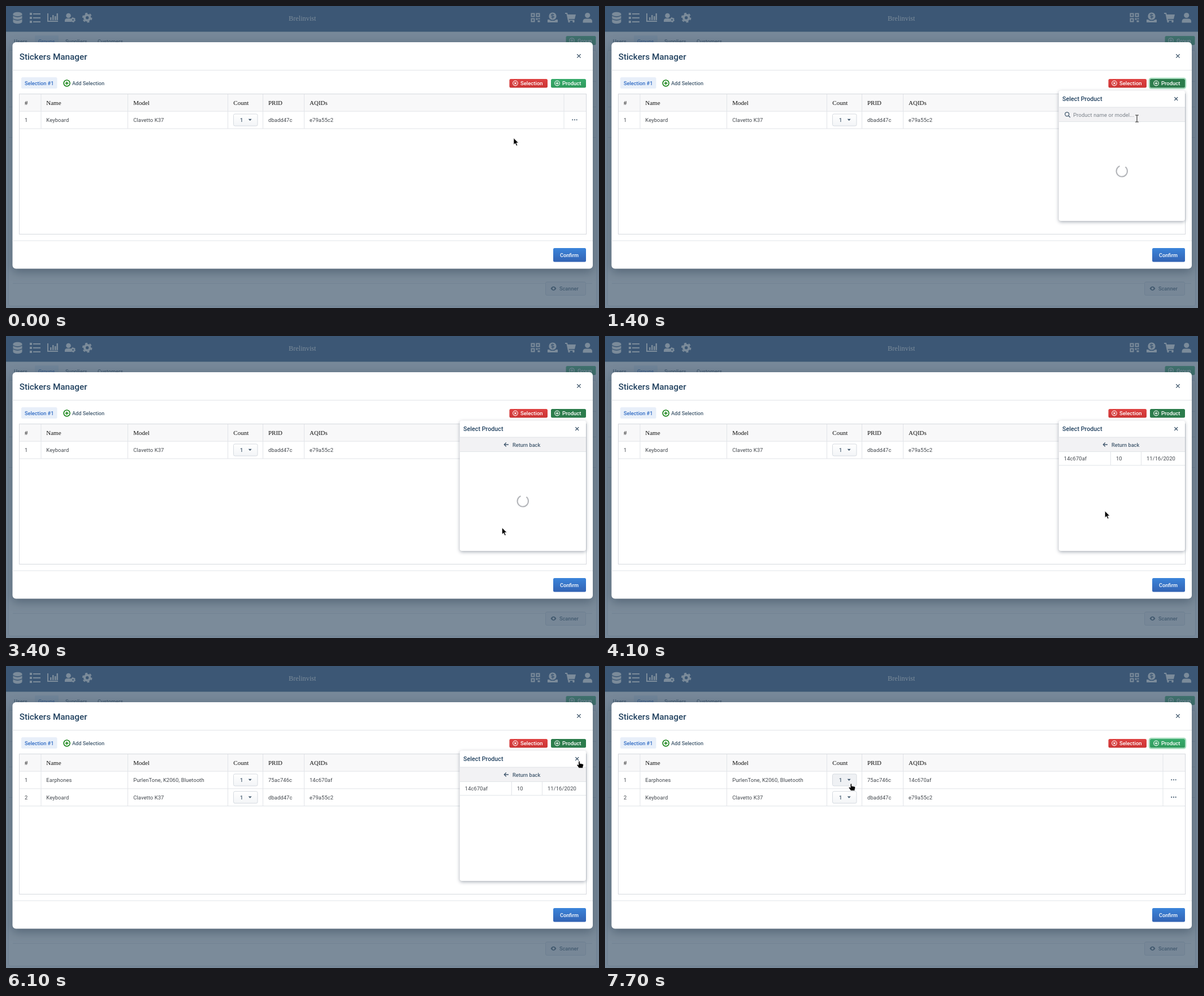
Recreate the animation shown at these times as an HTML page. Size 1049 by 534 pixels, loop 8 s.

```html
<!DOCTYPE html>
<html lang="en">
<head>
<meta charset="utf-8">
<title>Stickers Manager</title>
<style>
  html, body { margin: 0; width: 100%; height: 100%; overflow: hidden; background: #7b8c9a; }
  svg { display: block; width: 100vw; height: 100vh; }
  text { font: 9.4px Roboto, sans-serif; letter-spacing: .1px; fill: #435a6f; white-space: pre; }
  .cell { fill: #42474d; }
  .m { font-weight: 500; font-size: 9.2px; letter-spacing: 0; }
  .b { font-weight: 500; font-size: 9.5px; letter-spacing: 0; fill: #fff; }
  .h { font-weight: 500; font-size: 10.75px; letter-spacing: 0; fill: #234361; }
  .title { font-weight: 500; font-size: 15.36px; letter-spacing: -.05px; fill: #234361; }
  .serif { font: 11px "Liberation Serif", serif; letter-spacing: 0; fill: #111; }
  .brand { font: 12.3px "Liberation Serif", serif; letter-spacing: 0; fill: #fff; }
  .blue { fill: #2f6bc4; }
  .hint { fill: #7a8189; }
  .line { stroke: #e1e4e8; fill: none; }
  .ink { stroke: #435a6f; fill: none; stroke-width: 1.3; }
  .wire { stroke: #fff; fill: none; stroke-width: 1.1; }
  .modal { filter: drop-shadow(0 5px 9px rgba(20, 40, 60, .4)); }
  .pop { filter: drop-shadow(0 2px 3px rgba(40, 55, 75, .4)); }
</style>
</head>
<body>
<svg id="stage" viewBox="0 0 1049 534" preserveAspectRatio="none">
  <defs>
    <linearGradient id="blue" x2="0" y2="1"><stop stop-color="#3b84da"/><stop offset="1" stop-color="#3363b3"/></linearGradient>
    <linearGradient id="red" x2="0" y2="1"><stop stop-color="#df4343"/><stop offset="1" stop-color="#cb3434"/></linearGradient>
    <linearGradient id="green" x2="0" y2="1"><stop stop-color="#38ab6c"/><stop offset="1" stop-color="#2f9a5c"/></linearGradient>
    <linearGradient id="pale" x2="0" y2="1"><stop stop-color="#fff"/><stop offset="1" stop-color="#f3f5f7"/></linearGradient>
    <clipPath id="listBox"><path d="M803 204.500h223v175h-223z"/></clipPath>
  </defs>

  <g id="page">
    <rect width="1049" height="534" fill="#f4f7fb"/>
    <rect width="1049" height="45.500" fill="#2c5282"/>
    <g id="icons" fill="#fff">
      <path d="M12.500 14.500c0-5 16-5 16 0v13c0 5-16 5-16 0z"/>
      <path d="M12 16.500q8.500 5 17 0M12 22.500q8.500 5 17 0" fill="none" stroke="#2c5282" stroke-width="1.300"/>
      <path d="M42 12h4v4h-4zm6 1h13v2H48zm-6 6h4v4h-4zm6 1h13v2H48zm-6 6h4v4h-4zm6 1h13v2H48z"/>
      <path d="M73 13h2v13h17v2H73zm5 7h2.500v5H78zm4-4h2.500v9H82zm4 2h2.500v7H86zm3.500-5H92v12h-2.500z"/>
      <circle cx="110.500" cy="17" r="4.300"/>
      <path d="M104 28v-2q0-4 4-4h5q2 0 3 2l-1 4z"/>
      <circle cx="118.500" cy="24.500" r="2.600" fill="none" stroke="#fff" stroke-width="2.200"/>
      <circle cx="118.500" cy="24.500" r="4.200" fill="none" stroke="#fff" stroke-dasharray="2.200"/>
      <circle cx="143.700" cy="20.800" r="4.700" fill="none" stroke="#fff" stroke-width="4"/>
      <circle cx="143.700" cy="20.800" r="7.600" fill="none" stroke="#fff" stroke-width="2.400" stroke-dasharray="4 3.960"/>
      <path d="M929.500 13.500h5v5h-5zm9 0h5v5h-5zm-9 9h5v5h-5z" fill="none" stroke="#fff" stroke-width="2"/>
      <path d="M937.500 21.500h3v3h-3zm4 0h3v2h-3zm-1 4h4v3h-4z"/>
      <circle cx="967" cy="18" r="6.600"/>
      <path d="M958 24h3l3 2h6l3-2h3v5h-18z"/>
      <path d="M969.500 15.500q-5-2-5 .500t5 2.500q0 3-5 1.500M967 13.500v9" fill="none" stroke="#2c5282" stroke-width="1.100"/>
      <path d="M989 12h4l.700 3H1008l-2 8h-10.500l.400 1.500h9.600v1.500h-11.500L991.500 14H989z"/>
      <circle cx="996" cy="27.500" r="1.800"/><circle cx="1004" cy="27.500" r="1.800"/>
      <circle cx="1028.700" cy="16.500" r="4.600"/>
      <path d="M1020.500 29.500v-2q0-5 5-5h6.500q5 0 5 5v2z"/>
    </g>
    <text class="brand" x="500" y="26">Brelinvist</text>
    <rect x="51" y="52" width="42" height="21" rx="2" fill="#dbe8f8"/>
    <g id="tabs"></g>
    <rect x="990.500" y="53" width="53" height="16" rx="2.500" fill="url(#green)"/>
    <circle class="wire" cx="1001" cy="61" r="4.300"/><path class="wire" d="M998.500 61h5m-2.500-2.500v5"/>
    <text class="b" x="1011" y="64.500">Group</text>
    <rect x="4.500" y="78.500" width="1040" height="452" rx="3" fill="#fff" stroke="#d4dbe4"/>
    <path d="M4 133.500h1041M4 178.500h1041M4 232.500h1041M12 490.500h1025" stroke="#dde3ea"/>
    <rect x="954.500" y="488" width="71" height="23.500" rx="2.500" fill="#f1f4f7" stroke="#d4dbe4"/>
    <path d="M963.500 499.500q5-7.500 10 0q-5 7.500-10 0z" fill="#435a6f"/><circle cx="968.500" cy="499.500" r="1.900" fill="#f1f4f7"/>
    <text class="m" x="979" y="503">Scanner</text>
  </g>
  <rect width="1049" height="534" fill="rgba(67,90,111,.7)"/>

  <rect class="modal" x="11.500" y="64" width="1026.500" height="400.500" rx="6" fill="#fff"/>
  <path class="line" d="M11.500 113.500H1038M11.500 415H1038"/>
  <text class="title" x="23.700" y="94.500">Stickers Manager</text>
  <path class="ink" d="M1010.200 85.200l6.400 6.400m0-6.400l-6.400 6.400"/>
  <rect x="27" y="126" width="63.500" height="20" rx="2.500" fill="#e8eff9"/>
  <text class="m blue" x="33" y="139.500">Selection #1</text>
  <g fill="none" stroke="#108010" stroke-width="1.500"><circle cx="107.600" cy="136.500" r="5.500"/><path d="M104.500 136.500h6.200m-3.100-3.100v6.200"/></g>
  <text class="m" x="117" y="140">Add Selection</text>
  <rect x="890.500" y="129" width="67.500" height="15.500" rx="2.500" fill="url(#red)"/>
  <circle class="wire" cx="901" cy="136.600" r="4.300"/><path class="wire" d="M899.300 134.900l3.400 3.400m0-3.400l-3.400 3.400"/>
  <text class="b" x="910" y="140.200">Selection</text>
  <rect id="ring" x="962.900" y="127.900" width="64.200" height="17.700" rx="3.500" fill="none" stroke="#a5dcbd" stroke-width="2.300"/>
  <rect id="add" x="964" y="129" width="62" height="15.500" rx="2.500"/>
  <circle class="wire" cx="975" cy="136.600" r="4.300"/><path class="wire" d="M972.600 136.600h4.800m-2.400-2.400v4.800"/>
  <text class="b" x="984" y="140.200">Product</text>

  <rect x="23.500" y="155.500" width="1003" height="30.500" fill="#f8f8f9"/>
  <g id="head"></g>
  <g id="one"></g>
  <g id="two"></g>
  <rect x="23.500" y="155.500" width="1003" height="248" fill="none" stroke="#d6d9de"/>
  <rect x="968" y="428" width="58" height="24.500" rx="2.500" fill="url(#blue)"/>
  <text class="m" x="980" y="443.700" style="fill:#fff">Confirm</text>

  <g id="pop">
    <rect class="pop" x="802.700" y="149.500" width="223.300" height="230.500" rx="4" fill="#fff"/>
    <rect id="press" x="998.500" y="152" width="23.500" height="24" rx="2.500" fill="#e8ebef"/>
    <text class="h" x="809" y="168">Select Product</text>
    <path class="ink" d="M1007.300 161.200l5.800 5.800m0-5.800l-5.800 5.800"/>
    <rect x="802.700" y="179" width="223.300" height="25.500" fill="#f2f2f4"/>
    <path class="line" d="M802.700 179h223.300M802.700 204.500h223.300"/>
    <g id="search">
      <circle class="ink" cx="817.300" cy="191.300" r="3.500"/><path class="ink" d="M819.900 194l3 3"/>
      <text class="hint" x="828.300" y="195.600">Product name or model...</text>
    </g>
    <g id="back">
      <path class="ink" d="M889 192h-7.600m3.400-3.500l-3.500 3.500l3.500 3.500"/>
      <text class="m" x="896" y="195.600">Return back</text>
    </g>
    <circle id="spin" cx="914.300" cy="292" r="9.700" fill="none" stroke="#b4b6ba" stroke-width="2.100" stroke-dasharray="50 11"/>
    <g id="list" clip-path="url(#listBox)"></g>
    <g id="record">
      <path class="line" d="M803 228.700h223M894.500 204.500v24M948.500 204.500v24"/>
      <text class="cell" x="811.800" y="219.800">14c670af</text>
      <text class="cell" x="904" y="219.800">10</text>
      <text class="cell" x="958" y="219.800">11/16/2020</text>
    </g>
  </g>

  <g id="cursor" stroke="#fff" stroke-width=".7" stroke-linejoin="round">
    <path id="arrow" d="M0 0v11.800l2.800-2.500l2 4.500l2-.900l-2-4.400h3.700z" fill="#000"/>
    <path id="hand" d="M-1.200.800q1.200-1.600 2.400 0v3.400l5.200 1.100q1.200.400 1.100 1.900l-.900 3.200v2h-7l-3.500-4.700q-.700-1.500 1-1.700l1.700 1.200z" fill="#000"/>
    <g id="beam" fill="none"><path d="M-3-6h2.500l.5.600l.5-.600H3M0-5.500v11M-3 6h2.500l.5-.600l.5.600H3" stroke-width="2.400"/><path d="M-3-6h2.500l.5.600l.5-.600H3M0-5.500v11M-3 6h2.500l.5-.600l.5.600H3" stroke="#222" stroke-width="1.100"/></g>
  </g>
</svg>
<script>
const $ = id => document.getElementById(id);
const text = (x, y, s, cls = 'cell') => `<text class="${cls}" x="${x}" y="${y}">${s}</text>`;
const line = d => `<path class="line" d="${d}"/>`;
const LOOP = 8000, TICK = 100, ROW = 30.7, ITEM = 24.64;
const columns = [33, 71.3, 225.2, 402.3, 464, 537];
const rules = [62, 215.5, 392.5, 454.5, 527.5, 987];

$('tabs').innerHTML = [[14, 'Users'], [57, 'Groups'], [105, 'Suppliers'], [162, 'Customers']]
  .map(([x, s]) => text(x, 66, s, s === 'Groups' ? 'm blue' : 'm')).join('');

const grid = y => rules.map(x => line(`M${x} ${y}v${ROW}`)).join('') + line(`M24 ${y + ROW}h1002`);

$('head').innerHTML = grid(155.5) +
  ['#', 'Name', 'Model', 'Count', 'PRID', 'AQIDs'].map((s, i) => text(columns[i], 175, s, 'serif')).join('');

function tableRow(index, cells) {
  const y = 186.2 + index * ROW;
  const dots = [1002.2, 1005.9, 1009.6].map(x => `<circle cx="${x}" cy="${y + 15}" r="1.05" fill="#435a6f"/>`).join('');
  const count = `<rect class="count" x="402.5" y="${y + 4.8}" width="42.5" height="21" rx="2.5" fill="url(#pale)" stroke="#d5dae0"/>` +
    text(414, y + 18.9, '1', 'm') + `<path d="M428.700 ${y + 13.6}h6l-3 3.300z" fill="#435a6f"/>`;
  return grid(y) + dots + count +
    [index + 1, ...cells].map((s, i) => text(columns[i < 3 ? i : i + 1], y + 18.9, s)).join('');
}

const keyboard = ['Keyboard', 'Clavetto K37', 'dbadd47c', 'e79a55c2'];
const earphones = ['Earphones', 'PurlenTone, K2060, Bluetooth', '75ac746c', '14c670af'];
$('one').innerHTML = tableRow(0, keyboard);
$('two').innerHTML = tableRow(0, earphones) + tableRow(1, keyboard);

const more = '<tspan font-weight="700" letter-spacing="1.4">...</tspan>';
const products = [
  ['Battery Voltun, H42, AAA', '40'],
  ['Cable WirreLome, Type-C to 2' + more, '300'],
  ['Cable Nettara 250, FTP/UTP', '30'],
  ['Charger Zapelo, microUSB', '540'],
  ['Computer fan Brufy, KLW-3040', '930'],
  ['Earphones PurlenTone, K206' + more, '1,440'],
  ['Headphones BoomaVelth R400', '1,800']
];
$('list').innerHTML = products.map(([name, price], i) => {
  const y = 219.8 + i * ITEM;
  return text(811.8, y, name) + text(969.5, y, price) + line(`M803 ${y + 9.4}h212`);
}).join('') + line('M960.500 204.500v176') +
  '<path d="M1014.500 204.500h11v175h-11z" fill="#f1f1f1"/>' +
  '<path d="M1016 216h8.300v41.500h-8.300z" fill="#c1c1c1"/>' +
  '<path d="M1017 212h6l-3-3.300z" fill="#a0a0a0"/><path d="M1017 372.300h6l-3 3.300z" fill="#444"/>';

// start, number of ticks, end point, pointer shape
const moves = [
  [0, 1, 898, 233.5, 'arrow'],
  [100, 1, 904, 230.5, 'arrow'],
  [300, 3, 980, 150, 'arrow'],
  [600, 2, 993, 137, 'hand'],
  [1200, 1, 972, 168, 'arrow'],
  [1300, 2, 941, 199, 'beam'],
  [1500, 4, 912, 268, 'arrow'],
  [1900, 7, 882.5, 321, 'hand'],
  [3000, 1, 877.5, 339, 'hand'],
  [3400, 1, 877.5, 339, 'arrow'],
  [3800, 1, 880, 335, 'arrow'],
  [4000, 2, 884.3, 309.5, 'arrow'],
  [4300, 2, 872, 233, 'arrow'],
  [4600, 1, 866, 220, 'hand'],
  [4800, 1, 865.5, 218.5, 'hand'],
  [5700, 2, 971, 194, 'hand'],
  [6000, 2, 1014, 168, 'hand'],
  [6300, 1, 1013.3, 167, 'hand'],
  [7000, 3, 650, 208.5, 'arrow'],
  [7400, 1, 540, 208.5, 'arrow'],
  [7500, 1, 437, 208, 'hand'],
  [7700, 1, 435.3, 208, 'hand']
];

const show = (id, on) => { $(id).style.display = on ? '' : 'none'; };

function placeCursor(t) {
  const i = moves.findLastIndex(m => m[0] <= t);
  const [start, ticks, x, y, shape] = moves[i];
  const from = moves[Math.max(0, i - 1)];
  const k = Math.min(1, (Math.floor((t - start) / TICK) + 1) / ticks);
  const cx = from[2] + (x - from[2]) * k, cy = from[3] + (y - from[3]) * k;
  $('cursor').setAttribute('transform', `translate(${cx} ${cy})`);
  for (const id of ['arrow', 'hand', 'beam']) show(id, id === shape);
}

function draw(t) {
  const within = (a, b) => t >= a && t < b;
  const open = within(1100, 6800);
  show('pop', open);
  $('pop').style.opacity = t < 1200 ? .6 : 1;
  show('ring', within(1000, 3200) || t >= 6800);
  $('add').setAttribute('fill', within(1000, 6800) ? '#2c7c4c' : within(600, 1000) ? '#2f9058' : 'url(#green)');
  show('search', t < 3400);
  show('back', t >= 3400);
  show('list', within(1900, 3400));
  show('record', t >= 4000);
  show('press', within(6600, 6800));
  show('spin', t < 1900 || within(3400, 4000));
  const beat = t < 1900 ? TICK : 2 * TICK;
  const turn = (Math.floor(t / beat) * beat - 1400) * .36 - 50;
  $('spin').setAttribute('transform', `rotate(${turn} 914.3 292)`);
  show('one', t < 5200);
  show('two', t >= 5200);
  $('two').querySelector('.count').setAttribute('fill', t >= 7500 ? '#eff1f4' : 'url(#pale)');
  placeCursor(t);
}

const begin = performance.now();
function frame(now) {
  draw(Math.max(0, now - begin) % LOOP);
  requestAnimationFrame(frame);
}
draw(0);
requestAnimationFrame(frame);
</script>
</body>
</html>
```
